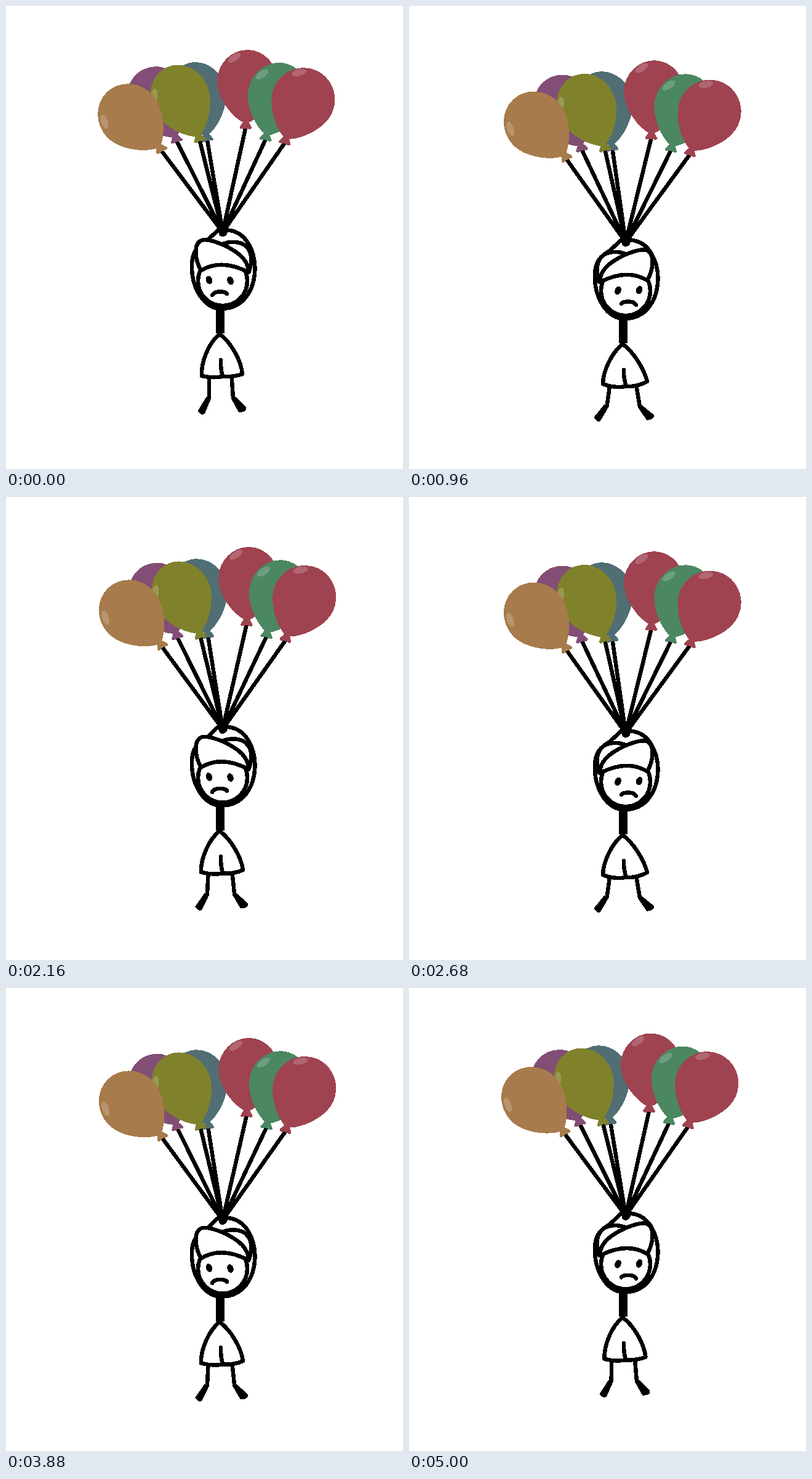
Animation of 645x751 px, one loop 5040 ms. Source, as an HTML page:

```html
<!DOCTYPE html>
<html lang="en">
<head>
<meta charset="utf-8">
<title>Balloons</title>
<style>
html, body { margin: 0; width: 100%; height: 100%; overflow: hidden; background: #fff; }
svg { display: block; width: 100vw; height: 100vh; }
.line { fill: none; stroke: #000; stroke-width: 6.5; stroke-linecap: round; stroke-linejoin: round; }
.white { fill: #fff; }
</style>
</head>
<body>
<svg viewBox="0 0 645 751" shape-rendering="crispEdges">
  <g id="all">
    <g id="bunch"></g>

    <g class="line">
      <path d="M350 491C322 491 301 458 302 420C302 398 312 389 326 381L344 364"/>
      <path d="M350 491C385 491 404 462 404.500 425C404 400 392 366 360 363.500"/>
    </g>
    <path d="M344 361L362 360L359 370Q352 378 346 370Z"/>
    <path d="M347.500 488V531" stroke="#000" stroke-width="14"/>

    <g id="head">
      <circle class="line white" cx="352" cy="446" r="40"/>
      <path class="line white" d="M350 387C365 380 385 382 392 392C402 403 398 420 395 431"/>
      <path class="line white" d="M317 429C308 414 303 386 318 380C326 377 350 384 369 396C384 405 394 416 394 432Q350 409 317 429Z"/>
      <ellipse cx="330" cy="444.500" rx="5" ry="7" transform="rotate(-20 330 444.5)"/>
      <ellipse cx="364.500" cy="445.500" rx="5" ry="7" transform="rotate(-20 364.5 445.5)"/>
      <path class="line" d="M335 469Q339 463 347 463.500Q356 463 359 467"/>
    </g>

    <g id="legL">
      <path class="line" d="M330 600V636"/>
      <path d="M325.500 634L333 637L323 661Q318 666 311.500 657Z"/>
    </g>
    <g id="legR">
      <path class="line" d="M366.500 600L369 636"/>
      <path d="M366 637L373 634L390 651Q392 659 378 659Z"/>
    </g>
    <path id="shorts" class="line white"/>
    <path id="seam" class="line"/>
  </g>
</svg>
<script>
const $ = id => document.getElementById(id);
const NS = 'http://www.w3.org/2000/svg';
const LOOP = 5040, CYCLE = 1720, LOW = 840, STEP = 40;
const DROP = 17.7, TILT = 1.45;

function add(parent, tag, attrs) {
  const el = document.createElementNS(NS, tag);
  for (const k in attrs) el.setAttribute(k, attrs[k]);
  parent.appendChild(el);
}

// Back to front; x, y is the tip, shine is [x, y, angle].
const balloons = [
  { x: 275.5, y: 213, a: -25, w: 98, h: 122, color: '#824e75' },
  { x: 326, y: 211, a: -13.5, w: 96, h: 122, color: '#506e74' },
  { x: 313, y: 212, a: -25, w: 95.5, h: 124, color: '#80812b', shine: [241, 146, 95] },
  { x: 250, y: 229, a: -44, w: 101, h: 124, color: '#a77b4b', shine: [160, 188, 70] },
  { x: 389.5, y: 191, a: 2, w: 98, h: 120, color: '#9f4350', shine: [371, 84, -35] },
  { x: 423, y: 210, a: 16, w: 98, h: 121, color: '#4b8761', shine: [416, 111, -35] },
  { x: 454.5, y: 216, a: 24, w: 103, h: 122, color: '#9f4350', shine: [476, 108, -12] }
];

function body(w, h) {
  const r = w / 2, m = -h * 0.57, k = r * 0.55, u = (h + m) * 0.55;
  return `M0 0C${-r * 0.42} ${-h * 0.06} ${-r} ${m + h * 0.24} ${-r} ${m}` +
    `C${-r} ${m - u} ${-k} ${-h} 0 ${-h}C${k} ${-h} ${r} ${m - u} ${r} ${m}` +
    `C${r} ${m + h * 0.24} ${r * 0.42} ${-h * 0.06} 0 0Z`;
}

const bunch = $('bunch');
for (const b of balloons) {
  const r = b.a * Math.PI / 180;
  add(bunch, 'path', { class: 'line', d: `M${b.x - 4 * Math.sin(r)} ${b.y + 6}L352 367` });
}
for (const b of balloons) {
  const at = `translate(${b.x} ${b.y}) rotate(`;
  add(bunch, 'path', { d: body(b.w, b.h), fill: b.color, transform: at + b.a + ')' });
  add(bunch, 'path', {
    d: 'M-4 -4L-10 6Q-9 10 -4 8Q0 7 4 8Q9 10 10 6L4 -4Z',
    fill: b.color, transform: at + b.a * 0.7 + ')'
  });
  if (b.shine) {
    const [x, y, a] = b.shine;
    add(bunch, 'ellipse', {
      cx: x, cy: y, rx: 12, ry: 5.5, fill: '#fff', 'fill-opacity': 0.19,
      transform: `rotate(${a} ${x} ${y})`
    });
  }
}
add(bunch, 'circle', { cx: 352, cy: 368, r: 6.5 });

const wave = u => (1 - Math.cos(u * Math.PI)) / 2;

// 0 at the top, 1 at the bottom: a soft fall, then a steadier rise.
function height(ph) {
  if (ph < LOW) return wave(ph / LOW);
  const u = (ph - LOW) / (CYCLE - LOW);
  return 1 - (u + wave(u)) / 2;
}

function draw(ms) {
  const ph = Math.floor(ms % LOOP / STEP) * STEP % CYCLE;
  const p = height(ph);
  const q = wave(2 * (ph - 80) / CYCLE) - 0.02;

  $('all').setAttribute('transform', `translate(0 ${DROP * p})`);
  bunch.setAttribute('transform', `rotate(${TILT * q} 352 367)`);
  $('head').setAttribute('transform', ph < LOW ? '' : 'translate(704 0) scale(-1 1)');
  $('legL').setAttribute('transform', `rotate(${8 * q} 350 573)`);
  $('legR').setAttribute('transform', `rotate(${-5.7 * q} 350 573)`);
  $('shorts').setAttribute('d',
    `M347 532C330 546 ${317 - 2 * q} 575 ${318 - 3 * q} ${600 - 3 * q}` +
    `Q${335 - q} 604 ${352 - q} 601Q370 602 ${384 + 3 * q} ${597 - 4 * q}` +
    `C${382 + q} 575 366 546 347 532Z`);
  $('seam').setAttribute('d', `M349 574Q348.500 588 ${352 + q} 601`);
}

const start = performance.now();
function tick() {
  draw(performance.now() - start);
  requestAnimationFrame(tick);
}
tick();
</script>
</body>
</html>
```
